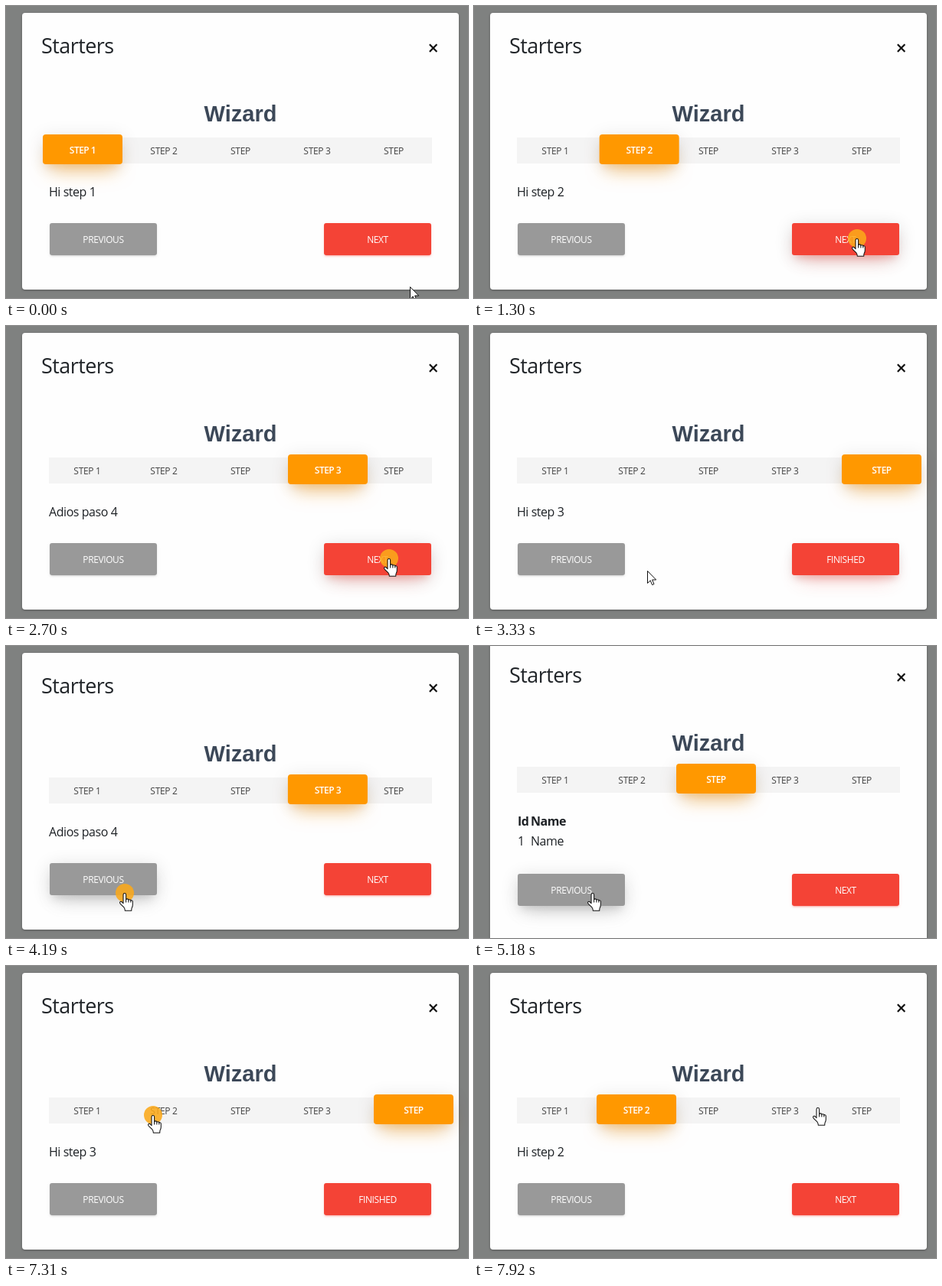
Recreate the animation shown at these times as an HTML page. Size 603 by 382 pixels, loop 8 s.

```html
<!DOCTYPE html>
<html lang="en">
<head>
<meta charset="utf-8">
<title>Wizard</title>
<style>
@property --step { syntax: "<number>"; inherits: true; initial-value: 0; }
@property --grow { syntax: "<length>"; inherits: true; initial-value: 0px; }

html, body { margin: 0; width: 100%; height: 100%; overflow: hidden; }
body {
  position: relative;
  background: #7f8180;
  font: 12px/36px "Open Sans", "Noto Sans", sans-serif;
  letter-spacing: -.3px;
  animation: step 8s step-end infinite;
}
.modal, .modal > *, .cursor, .cursor > * { position: absolute; }
.modal {
  left: 21px; top: calc(9px - var(--grow));
  width: 570px; height: calc(362px + 2 * var(--grow));
  border-radius: 4px;
  background: #fefefe;
  box-shadow: 0 1px 3px rgba(0, 0, 0, .35);
}
h1, h2 { margin: 0; }
h1 { left: 25px; top: 23px; font-size: 27px; line-height: 40px; font-weight: 500; letter-spacing: -.55px; color: #212529; }
h2 {
  left: 35px; top: 112px; width: 500px;
  font: bold 29px/40px "Liberation Sans", Arial, sans-serif;
  letter-spacing: 0; text-align: center; color: #3c4858;
}
.close { left: 521.5px; top: 29.5px; width: 30px; font-size: 25px; line-height: 30px; font-weight: 600; text-align: center; color: #111; }
.bar { left: 35px; top: 163px; width: 500px; height: 34px; display: flex; background: #f4f4f4; color: #434343; }
.bar span { flex: 1; text-align: center; }

/* A strip shows one of its rows, picked by --step. */
.strip { overflow: hidden; height: var(--row); }
.strip > div { transform: translateY(calc(var(--step) * -1 * var(--row))); }
.strip > div > * { height: var(--row); }

.tab {
  --row: 39px;
  left: 27px; top: 159px; width: 104px;
  border-radius: 4px;
  background: #ff9800; color: #fff;
  line-height: 41px; font-weight: 600; letter-spacing: -.5px; text-align: center;
  box-shadow: 0 16px 26px -10px rgba(255, 152, 0, .56), 0 4px 25px rgba(0, 0, 0, .12), 0 8px 10px -5px rgba(255, 152, 0, .2);
  animation: tab 8s cubic-bezier(.29, 1.42, .79, 1) infinite;
}
.panels { --row: 52px; left: 35px; top: 221px; width: 300px; font-size: 16px; line-height: 26px; letter-spacing: -.45px; color: #1d2125; }
.grid { display: grid; grid-template-columns: 17px 100px; padding-left: 1px; }

.button {
  --row: 42px;
  --rest: 0 2px 2px rgba(var(--tint), .14), 0 3px 1px -2px rgba(var(--tint), .2), 0 1px 5px rgba(var(--tint), .12);
  --focus: 0 14px 26px -12px rgba(var(--tint), .42), 0 4px 14px rgba(0, 0, 0, .08), 0 8px 10px -5px rgba(var(--tint), .25);
  --hover: 0 14px 26px -12px rgba(var(--tint), .42), 0 4px 23px rgba(0, 0, 0, .14), 0 8px 10px -5px rgba(var(--tint), .25);
  bottom: 45px; width: 140px;
  border-radius: 3px;
  background: rgb(var(--tint)); color: #fff;
  line-height: 44px; font-weight: 500; letter-spacing: -.4px; text-align: center;
  box-shadow: var(--rest);
}
.previous { --tint: 153, 153, 153; left: 36px; height: 42px; animation: previous 8s infinite; }
.next { --tint: 244, 67, 54; left: 394px; animation: next 8s infinite; }

.cursor { left: 0; top: 0; animation: move 8s ease-in-out infinite; }
.cursor svg { overflow: visible; fill: #fff; stroke: #111; stroke-width: 1; stroke-linejoin: round; }
.hand { left: -8px; top: -1px; animation: hand 8s step-end infinite; }
.arrow { left: 0; top: 0; animation: arrow 8s step-end infinite; }
.click {
  left: -13px; top: -13px; width: 24px; height: 24px;
  border-radius: 50%;
  background: rgba(250, 168, 26, .88);
  opacity: 0;
  animation: click 8s step-end infinite;
}

@keyframes step {
  0% { --step: 0; --grow: 0px; }
  11% { --step: 1; --grow: 0px; }
  17.25% { --step: 2; --grow: 14px; }
  23.5% { --step: 3; --grow: 0px; }
  34.5% { --step: 4; --grow: 0px; }
  46.25% { --step: 3; --grow: 0px; }
  52.8% { --step: 2; --grow: 14px; }
  67.75% { --step: 1; --grow: 0px; }
  78.5% { --step: 4; --grow: 0px; }
  92.25%, 100% { --step: 1; --grow: 0px; }
}
@keyframes tab {
  0%, 11% { transform: translateX(0); }
  17.25% { transform: translateX(112px); }
  23.5% { transform: translateX(216px); }
  29.75%, 34.5% { transform: translateX(320px); }
  40.75%, 46.25% { transform: translateX(432px); }
  52.5%, 52.8% { transform: translateX(320px); }
  59.05%, 67.75% { transform: translateX(216px); }
  74%, 78.5% { transform: translateX(112px); }
  84.75%, 92.25% { transform: translateX(432px); }
  98.5%, 100% { transform: translateX(112px); }
}
@keyframes next {
  0%, 2.2% { box-shadow: var(--rest); }
  5.5%, 38% { box-shadow: var(--hover); }
  41%, 46% { box-shadow: var(--focus); }
  49%, 100% { box-shadow: var(--rest); }
}
@keyframes previous {
  0%, 43.7% { box-shadow: var(--rest); }
  46.5%, 71% { box-shadow: var(--hover); }
  74%, 78.5% { box-shadow: var(--focus); }
  81.5%, 100% { box-shadow: var(--rest); }
}
@keyframes move {
  0%, .6% { transform: translate(527px, 367px); }
  2.9%, 4.5% { transform: translate(508px, 316px); }
  9.4%, 36% { transform: translate(501px, 305px); }
  41.6% { transform: translate(226px, 320px); }
  44.5% { transform: translate(170px, 322px); }
  47%, 69% { transform: translate(156px, 324px); }
  77.4%, 80% { transform: translate(471px, 204px); }
  87.2% { transform: translate(265px, 196px); }
  89.2%, 93% { transform: translate(193px, 196px); }
  99%, 100% { transform: translate(450px, 186px); }
}
@keyframes hand {
  0%, 37.5%, 71.5% { opacity: 0; }
  2%, 43.3%, 76.9%, 100% { opacity: 1; }
}
@keyframes arrow {
  0%, 37.5%, 71.5% { opacity: 1; }
  2%, 43.3%, 76.9%, 100% { opacity: 0; }
}
@keyframes click {
  0%, 17.25%, 23.4%, 34.5%, 46.25%, 52.8%, 67.75%, 78.5%, 92.25%, 100% { opacity: 0; }
  15.8%, 22.25%, 33.75%, 45.2%, 51.7%, 66.75%, 77.5%, 91.375% { opacity: 1; }
}
</style>
</head>
<body>
<div class="modal">
  <h1>Starters</h1>
  <div class="close">×</div>
  <h2>Wizard</h2>
  <div class="bar"><span>STEP 1</span><span>STEP 2</span><span>STEP</span><span>STEP 3</span><span>STEP</span></div>
  <div class="panels strip"><div>
    <div>Hi step 1</div>
    <div>Hi step 2</div>
    <div class="grid"><b>Id</b><b>Name</b><span>1</span><span>Name</span></div>
    <div>Adios paso 4</div>
    <div>Hi step 3</div>
  </div></div>
  <div class="button previous">PREVIOUS</div>
  <div class="button next strip"><div>
    <div>NEXT</div><div>NEXT</div><div>NEXT</div><div>NEXT</div><div>FINISHED</div>
  </div></div>
  <div class="tab strip"><div>
    <div>STEP 1</div><div>STEP 2</div><div>STEP</div><div>STEP 3</div><div>STEP</div>
  </div></div>
</div>
<div class="cursor">
  <div class="click"></div>
  <svg class="hand" width="18.9" height="25.2" viewBox="0 0 18 24" >
    <path d="M6.5.5q1.7 0 1.7 1.8v6q.3-.9 1.6-.8 1.4.1 1.5 1.4 .3-.7 1.4-.6 1.3.1 1.4 1.4 .4-.6 1.2-.5 1.2.2 1.2 1.6v4q0 2-.9 3.6-.6 1-.6 3.7h-8q-.1-2.5-1.3-4L1.2 13.6Q-.1 11.6 1.2 10.9q1.3-.6 2.4.9l1.2 1.3V2.3Q4.8.5 6.5.5Z"/>
    <path fill="none" d="M8.2 8.3v3.7M11.3 8.9v3.1M14.1 9.7v2.3"/>
  </svg>
  <svg class="arrow" width="13" height="20">
    <path d="M.5.5v16l3.7-3.6 2.4 5.7 2.4-1-2.4-5.6h5.1Z"/>
  </svg>
</div>
</body>
</html>
```
